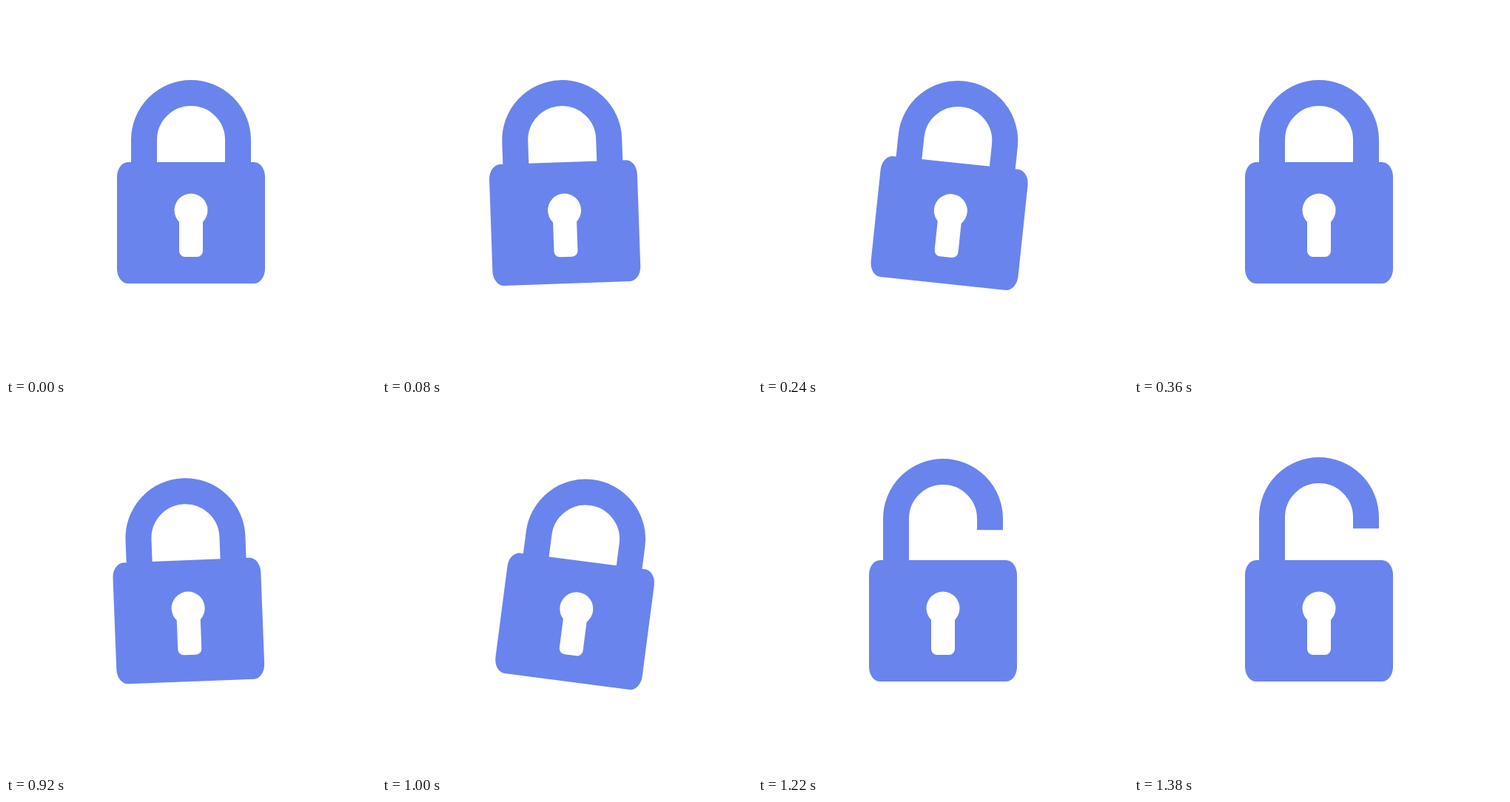
These frames come from a looping animation (500x500 px, 3.64 s). An HTML page:

```html
<!DOCTYPE html>
<html lang="en">
<head>
<meta charset="utf-8">
<title>Padlock</title>
<style>
  html, body { margin: 0; width: 100%; height: 100%; overflow: hidden; background: #fff; }
  svg { display: block; width: 100%; height: 100%; }
</style>
</head>
<body>
<svg viewBox="0 0 500 500">
  <g id="lock" fill="#6a84ed">
    <path id="shackle" fill="none" stroke="#6a84ed" stroke-width="35"/>
    <rect x="150" y="211" width="200" height="164" rx="15" ry="20"/>
    <g fill="#fff">
      <circle cx="250" cy="276" r="22.5"/>
      <rect x="234" y="276" width="32" height="63" rx="8"/>
    </g>
  </g>
</svg>
<script>
  const LOOP = 3640, STEP = 20;
  const lock = document.getElementById('lock');
  const shackle = document.getElementById('shackle');

  // [time in ms, degrees]
  const tilt = [
    [0, 0], [50, 10], [100, -10], [150, 10], [200, -10], [250, 10], [300, -10], [350, 0],
    [908, 0], [956, -8.9], [1004, 8.9], [1052, -8.9], [1100, 0]
  ];
  // [time in ms, y of the free end relative to the shackle]
  const legEnd = [[1069, 213], [1110, 196.3]];

  const progress = (t, start, end) => Math.min(1, Math.max(0, (t - start) / (end - start)));

  function valueAt(keys, t) {
    const next = keys.findIndex(([time]) => time > t);
    if (next === 0) return keys[0][1];
    if (next < 0) return keys[keys.length - 1][1];
    const [t0, v0] = keys[next - 1], [t1, v1] = keys[next];
    return v0 + (v1 - v0) * progress(t, t0, t1);
  }

  const easeOutQuart = u => 1 - (1 - u) ** 4;

  function draw(t) {
    const lift = 28 * easeOutQuart(progress(t, 1069, 1382));
    const arcY = 181 - lift;
    lock.setAttribute('transform', `rotate(${valueAt(tilt, t)} 250 375)`);
    shackle.setAttribute('d',
      `M186.5 215V${arcY}A63.5 63.5 0 0 1 313.5 ${arcY}V${valueAt(legEnd, t) - lift}`);
  }

  const start = performance.now();
  function tick() {
    const t = (performance.now() - start) % LOOP;
    draw(Math.floor(t / STEP) * STEP);
    requestAnimationFrame(tick);
  }
  tick();
</script>
</body>
</html>
```
